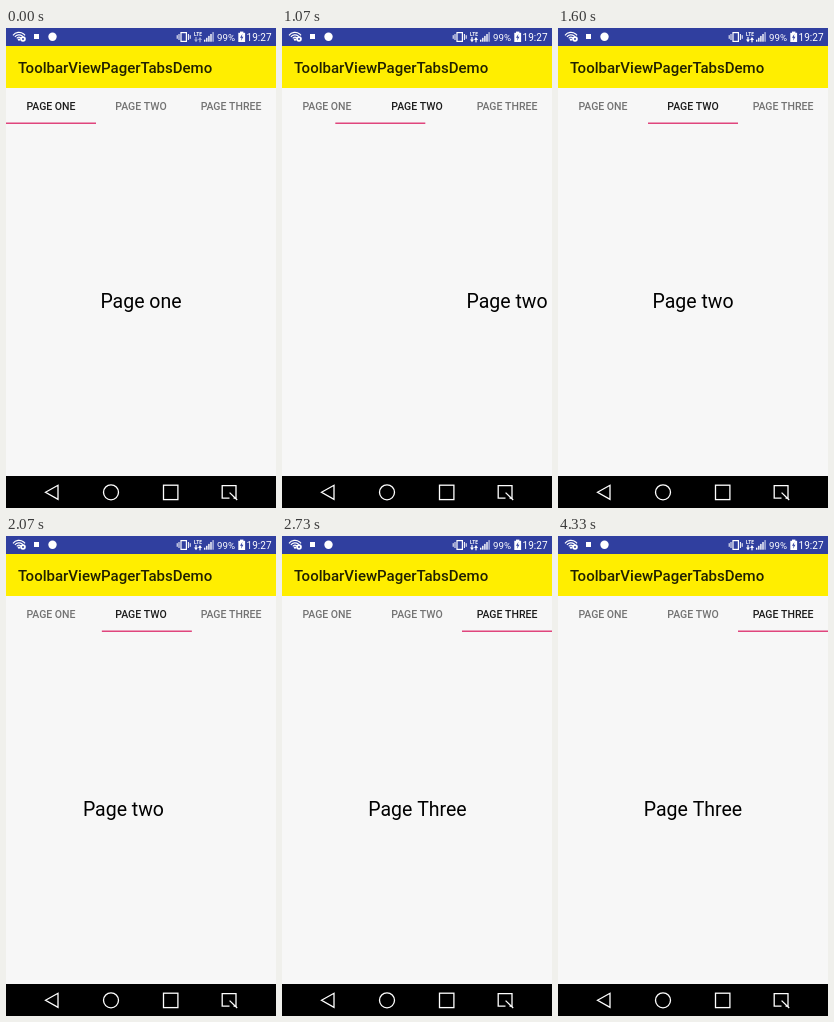
Animation, 270 px wide and 480 px high, one loop 4.39 s. Source, as an HTML page with a canvas:

```html
<!DOCTYPE html>
<html lang="en">
<head>
<meta charset="utf-8">
<title>Tabs demo</title>
<style>
  html, body { margin: 0; width: 100%; height: 100%; overflow: hidden; background: #f7f7f7; }
  canvas { display: block; width: 270px; height: 480px; }
</style>
</head>
<body>
<canvas id="stage" width="270" height="480"></canvas>
<script>
const ctx = document.getElementById('stage').getContext('2d');
const LOOP = 4390, FPS = 15;
const SWIPES = [12 / FPS, 31 / FPS];
const DRAG = [0.065, 0.16, 0.28, 0.44];
const RELEASE = 3 / FPS;
const TABS = ['PAGE ONE', 'PAGE TWO', 'PAGE THREE'];
const PAGES = ['Page one', 'Page two', 'Page Three'];
const FONT = 'Roboto, sans-serif';

function rect(color, x, y, w, h) {
  ctx.fillStyle = color;
  ctx.fillRect(x, y, w, h);
}

function text(str, x, y, size, color, weight = 400, align = 'left') {
  ctx.font = `${weight} ${size}px ${FONT}`;
  ctx.textAlign = align;
  ctx.fillStyle = color;
  ctx.fillText(str, x, y);
}

function path(points, closed) {
  ctx.beginPath();
  for (const [x, y] of points) ctx.lineTo(x, y);
  if (closed) ctx.closePath();
}

function stroke(color, width) {
  ctx.strokeStyle = color;
  ctx.lineWidth = width;
  ctx.stroke();
}

function line(points, width, closed = false) {
  path(points, closed);
  stroke('#fff', width);
}

function fill(points, color) {
  path(points, true);
  ctx.fillStyle = color;
  ctx.fill();
}

function disc(x, y, r, color) {
  ctx.beginPath();
  ctx.arc(x, y, r, 0, Math.PI * 2);
  ctx.fillStyle = color;
  ctx.fill();
}

// Finger drag, then the pager settles on a quintic curve.
function pageProgress(s) {
  if (s < 0) return 0;
  if (s <= RELEASE + 0.001) return DRAG[Math.round(s * FPS)];
  return 1 - 0.193 * (Math.max(0, 0.878 - s) / 0.548) ** 5;
}

// The tab underline follows the drag, then eases on its own.
function lineProgress(s) {
  if (s <= RELEASE + 0.001) return pageProgress(s);
  const left = Math.max(0, 1 - (s - RELEASE) / 0.36);
  return 1 - 0.56 * left ** 1.55;
}

function drawStatusBar(dataActive) {
  rect('#303f9f', 0, 0, 270, 18);

  // Wi-Fi with a small badge
  for (const r of [2.8, 5.2, 7.6]) {
    ctx.beginPath();
    ctx.arc(13, 12, r, -Math.PI * 0.79, -Math.PI * 0.21);
    stroke('#fff', 1.2);
  }
  disc(13, 11.6, 1.2, '#fff');
  disc(17, 11, 2.8, '#fff');
  disc(17, 11, 1, '#303f9f');

  rect('#fff', 28, 6, 5, 5);
  disc(46.5, 8.8, 4.2, '#fff');

  // Vibrate
  ctx.strokeStyle = '#fff';
  ctx.lineWidth = 1.2;
  ctx.strokeRect(175, 4.6, 5.4, 8.8);
  line([[173, 6], [173, 12]], 1);
  line([[171.2, 7.2], [171.2, 10.8]], 1);
  line([[182.4, 6], [182.4, 12]], 1);
  line([[184.2, 7.2], [184.2, 10.8]], 1);

  // Mobile data
  text('LTE', 192, 8.2, 4.8, '#fff', 700, 'center');
  const arrow = dataActive ? '#fff' : '#a3aad6';
  rect(arrow, 189.4, 9, 1.2, 3);
  fill([[188, 11.5], [192, 11.5], [190, 14.3]], arrow);
  rect(arrow, 193.4, 11, 1.2, 3.3);
  fill([[192, 12], [196, 12], [194, 9]], arrow);

  // Signal bars
  for (let i = 0; i < 5; i++) {
    const h = 2 + i * 1.9;
    rect(i < 4 ? '#fff' : '#b4badf', 198 + i * 2.1, 13.7 - h, 1.4, h);
  }

  text('99%', 211, 12.6, 9.7, '#fff');

  // Battery
  rect('#fff', 234, 3.6, 3.4, 1.4);
  rect('#fff', 232.3, 4.8, 6.8, 9.2);
  fill([[236.4, 6], [234, 9.8], [235.6, 9.8], [235, 12.8], [237.4, 8.8], [235.8, 8.8]], '#303f9f');

  text('19:27', 240.6, 12.8, 10, '#fff');
}

function drawNavBar() {
  rect('#000', 0, 448, 270, 32);
  line([[39.5, 464.3], [52, 457.3], [52, 471.3]], 1.3, true);
  ctx.beginPath();
  ctx.arc(105, 464.3, 7.5, 0, Math.PI * 2);
  stroke('#fff', 1.3);
  ctx.strokeRect(157.5, 457.2, 14.4, 14.4);
  line([[223.5, 470.2], [216.2, 470.2], [216.2, 457.6], [230, 457.6], [230, 470.2], [227.5, 470.2]], 1.3);
  line([[223.6, 464.6], [231.2, 472]], 1.3);
}

function draw(ms) {
  const frame = Math.floor((ms + 4) * FPS / 1000);
  const time = frame / FPS;
  let page = 0, underline = 0, selected = 0;
  for (const start of SWIPES) {
    const s = time - start + 1e-6;
    page += pageProgress(s);
    underline += lineProgress(s);
    if (s >= RELEASE) selected++;
  }

  rect('#f7f7f7', 0, 0, 270, 480);
  PAGES.forEach((name, i) =>
    text(name, 135 + (i - page) * 270, 279.5, 19.5, '#000', 400, 'center'));

  drawStatusBar((frame >= 4 && frame < 49) || frame >= 65);
  rect('#ffee00', 0, 18, 270, 42);
  text('ToolbarViewPagerTabsDemo', 12, 44.5, 15, '#212100', 500);

  TABS.forEach((name, i) =>
    text(name, 45 + i * 90, 82, 10.5, i === selected ? '#1c1c1c' : '#737373', 500, 'center'));
  rect('#e0457d', underline * 90, 94.5, 90, 1.5);

  drawNavBar();
}

function tick() {
  draw(performance.now() % LOOP);
  requestAnimationFrame(tick);
}
tick();
</script>
</body>
</html>
```
